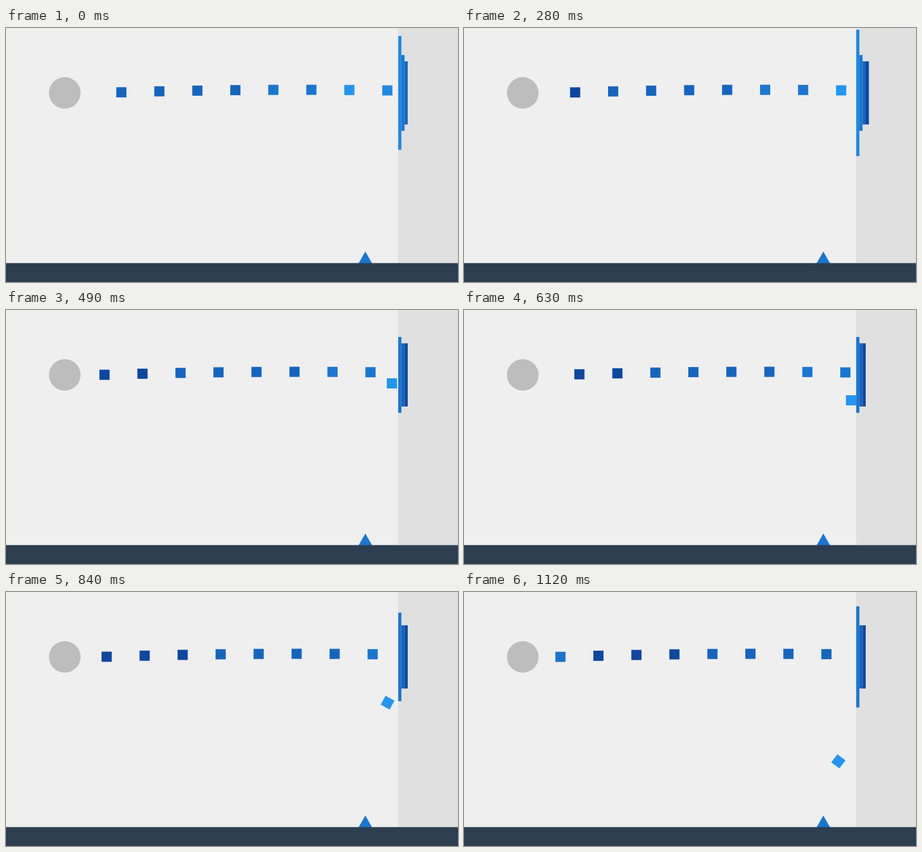
An HTML page with a canvas for the animation above (1190 ms loop, 800 by 450 pixels).

```html
<!DOCTYPE html>
<html lang="en">
<head>
<meta charset="utf-8">
<title>Squares against a wall</title>
<style>
  html, body { margin: 0; width: 100%; height: 100%; overflow: hidden; background: #efefef; }
  canvas { display: block; width: 800px; height: 450px; }
</style>
</head>
<body>
<canvas id="stage" width="800" height="450"></canvas>
<script>
const ctx = document.getElementById('stage').getContext('2d');
const STEP = 70, STEPS = 17;
const NAVY = '#0d47a1', DEEP = '#1565c0', MID = '#1976d2', SKY = '#1e88e5', LIGHT = '#2196f3';
const SIZE = 18, GAP = 67.25, SPEED = 14.95;
const WALL = 694, AXIS = 115, UNIT = 11.2, BAR = 5.6;

// Squares from the left-most (last launched) to the right-most.
const FIRST = -4, WEAK = 6;
const SHOTS = [MID, NAVY, NAVY, NAVY, DEEP, DEEP, DEEP, DEEP, MID, MID, LIGHT, SKY];

// Weak square sliding down the wall: x, y for steps 5 to 8.
const SLIDE = [[676.5, 112], [680, 118.5], [683, 130], [685, 145]];

function rect(x, y, w, h, color) {
  ctx.fillStyle = color;
  ctx.fillRect(x, y, w, h);
}

function square(x, y, color, turn = 0) {
  ctx.save();
  ctx.translate(x, y);
  ctx.rotate(turn * Math.PI / 180);
  rect(-SIZE / 2, -SIZE / 2, SIZE, SIZE, color);
  ctx.restore();
}

function scene() {
  rect(0, 0, 800, 450, '#efefef');
  rect(WALL, 0, 800 - WALL, 416.5, '#e0e0e0');
  ctx.fillStyle = '#bdbdbd';
  ctx.beginPath();
  ctx.arc(104, AXIS, 28, 0, Math.PI * 2);
  ctx.fill();
  ctx.fillStyle = MID;
  ctx.beginPath();
  ctx.moveTo(636, 396);
  ctx.lineTo(648, 417);
  ctx.lineTo(624, 417);
  ctx.fill();
  rect(0, 416.5, 800, 33.5, '#2c3e50');
}

// Each bar: colour and number of units, from the wall's face inwards.
function bars(step) {
  if (step < 5) {
    const list = [[SKY, step < 1 ? 18 : 20], [MID, 12], [DEEP, 10]];
    return step < 1 ? list : [...list, [NAVY, 10]];
  }
  const hits = step < 10 ? 12 : step < 15 ? 14 : 16;
  return [[MID, hits], [DEEP, 10], [NAVY, 10]];
}

function drawBars(step) {
  bars(step).forEach(([color, units], i) => {
    const h = units * UNIT;
    rect(WALL + 0.2 + i * BAR, AXIS - h / 2, BAR, h, color);
  });
}

function drawShots(step) {
  const travel = SPEED * step - (step > 9 ? 3.7 : 0);
  SHOTS.forEach((color, i) => {
    const k = FIRST + i;
    if (k === WEAK && step >= 5) return;
    const p = 204.2 + k * GAP + travel;
    if (p < 138.5 || p > 677) return;
    // soft start out of the launcher
    const x = p + 0.0197 * Math.max(0, 160.6 - p) ** 2;
    square(x, 109.5 + (x - 520) ** 2 / 22700, color);
  });
}

function drawWeak(step) {
  if (step < 5) return;
  if (step < 9) return square(...SLIDE[step - 5], LIGHT);
  const t = step - 9;
  square(685 - 3.2 * t, 160 + 6 * t + 2 * t * t, LIGHT, -20.4 * t);
}

function draw(step) {
  scene();
  drawBars(step);
  drawShots(step);
  drawWeak(step);
}

const start = performance.now();
function tick() {
  draw(Math.floor((performance.now() - start) / STEP) % STEPS);
  requestAnimationFrame(tick);
}
tick();
</script>
</body>
</html>
```
